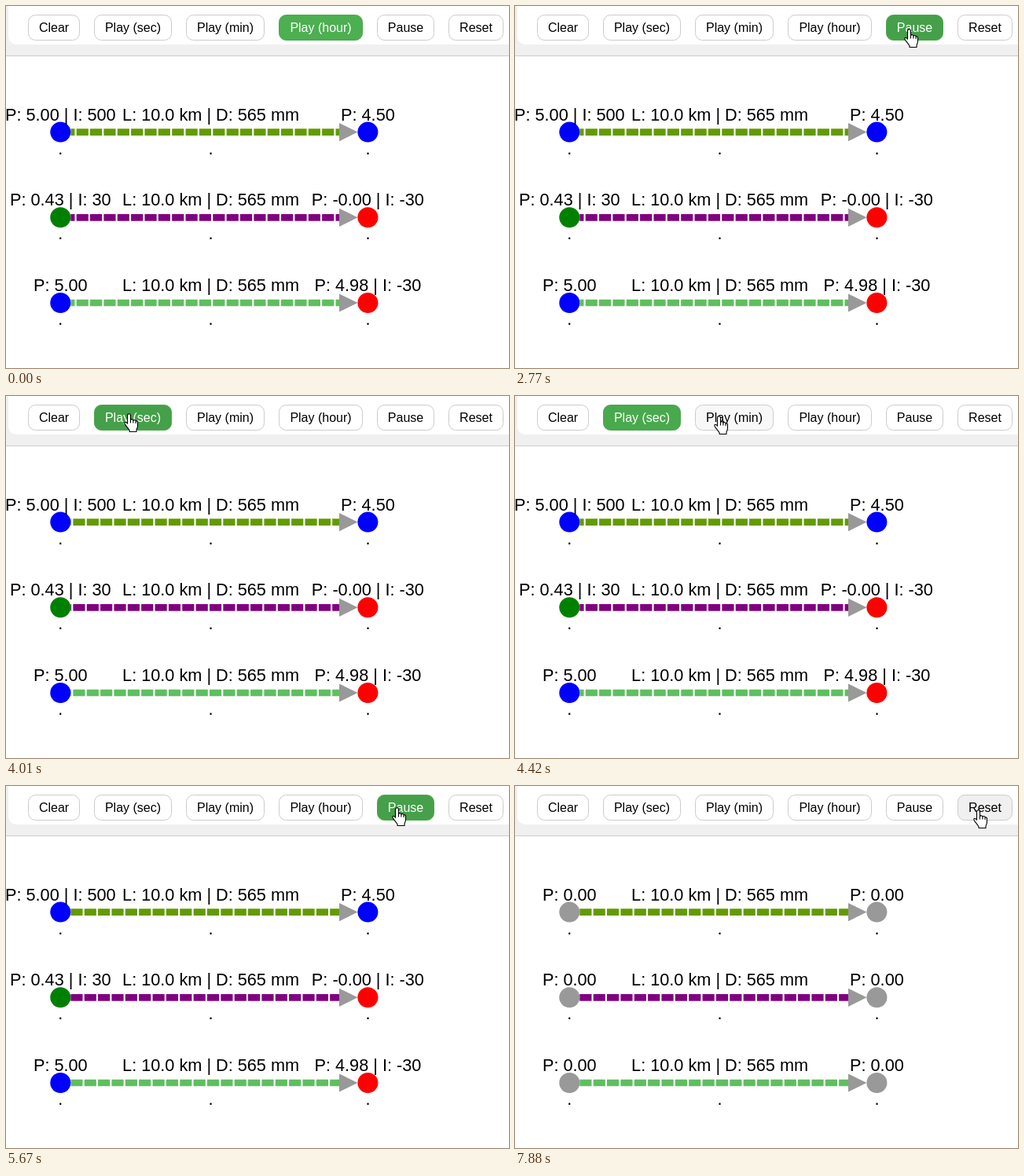
An HTML page that plays this animation: 640 by 461 pixels, repeating every 8 s.

```html
<!DOCTYPE html>
<html lang="en">
<head>
<meta charset="utf-8">
<title>Pipe network player</title>
<style>
  html, body { margin: 0; width: 100%; height: 100%; overflow: hidden; background: #fff; }
  svg { display: block; width: 640px; height: 461px; }
  text { font-family: "Liberation Sans", Arial, sans-serif; text-anchor: middle; }
  #bar text { font-size: 16px; }
  #net text { font-size: 21.7px; }
</style>
</head>
<body>
<svg id="stage" viewBox="0 0 640 461">
  <rect width="640" height="461" fill="#fff"/>
  <rect width="640" height="63" fill="#f0f0f0"/>
  <rect y="63" width="640" height="1" fill="#ccc"/>
  <rect x="3" y="-20" width="660" height="69" rx="10" fill="#fff"/>
  <g id="bar"></g>
  <g id="net"></g>
  <g id="cursor" fill="#fff" stroke="#000" stroke-width="1.1" stroke-linejoin="round" stroke-linecap="round">
    <path id="arrow" d="M0 0V16.5L3.9 13L6.6 19.2L9.2 18.1L6.6 12H11.8Z"/>
    <g id="hand" transform="translate(-1.5 -.5)">
      <path d="M-2 2.2a2 2 0 0 1 4 0V8.2a1.8 1.8 0 0 1 3.4.5a1.8 1.8 0 0 1 3.2.8a1.6 1.6 0 0 1 2.4 1.5V16c0 2-1.5 3.4-1.5 5v2H.6v-1.7C-.6 19.5-2.6 17-4.4 14.6c-1.3-1.8-1.7-2.7-1-3.5s2.2-.2 3.4 1.6Z"/>
      <path fill="none" d="M2 8.4v3M5.4 8.9v2.7M8.6 9.6v2.4"/>
    </g>
  </g>
</svg>
<script>
const LOOP = 8000;
const RESET = 7590, REDRAW = 7660;
const ZOOM = 2.17;
const DASH = 7 * ZOOM, GAP = ZOOM;
const FLOW = { from: 3510, to: 5435, start: -10, speed: 0.0954 };
const FADE = 300, TAPS = 16;

// label, left, width
const BUTTONS = [
  ["Clear", 28, 66], ["Play (sec)", 112, 99], ["Play (min)", 229, 100],
  ["Play (hour)", 347, 107], ["Pause", 472, 73], ["Reset", 563, 70]
];

// time at which each button becomes the active one
const CLICKS = [[-1e9, 3], [2000, 4], [3510, 1], [4650, 2], [5400, 4], [RESET, -1]];

// time, x, y of the pointer tip
const PATH = [
  [800, 577, 458], [1550, 510, 45], [1680, 508, 39], [1750, 508, 38], [1820, 504, 30],
  [2700, 504, 30], [2770, 503, 30], [3060, 370, 20], [3260, 210, 9], [3420, 158, 23],
  [4180, 158, 23], [4410, 261, 26], [4780, 261, 26], [5190, 491, 28], [5280, 499, 28],
  [6480, 499, 28], [6600, 513, 31], [6740, 513, 31], [7150, 589, 32], [7500, 591, 31]
];

// pipe colour, left label, left colour, right label, right colour
const ROWS = [
  ["#639b00", "P: 5.00 | I: 500", "#00f", "P: 4.50", "#00f"],
  ["#800080", "P: 0.43 | I: 30", "#008000", "P: -0.00 | I: -30", "#f00"],
  ["#5fbf5f", "P: 5.00", "#00f", "P: 4.98 | I: -30", "#f00"]
];

const $ = id => document.getElementById(id);

function add(parent, tag, attrs, text) {
  const el = document.createElementNS("http://www.w3.org/2000/svg", tag);
  for (const k in attrs) el.setAttribute(k, attrs[k]);
  if (text) el.textContent = text;
  return parent.appendChild(el);
}

const buttons = BUTTONS.map(([label, x, w]) => ({
  box: add($("bar"), "rect", { x: x + 0.5, y: 11.5, width: w - 1, height: 32, rx: 9 }),
  text: add($("bar"), "text", { x: x + w / 2, y: 33 }, label)
}));

const rows = ROWS.map(([color, leftText, leftFill, rightText, rightFill], i) => {
  const g = add($("net"), "g", { transform: `translate(0 ${160.6 + 108.7 * i})` });
  const pipe = add(g, "path", {
    d: "M82.3 0H424.5", stroke: color, "stroke-width": 4 * ZOOM, "stroke-dasharray": `${DASH} ${GAP}`
  });
  add(g, "path", { d: "M424 -11.6L447.5 0L424 11.6Z", fill: "#999" });
  const node = (x, label, fill) => ({
    label, fill,
    disc: add(g, "circle", { cx: x, cy: 0, r: 6 * ZOOM }),
    text: add(g, "text", { x, y: -15 })
  });
  const nodes = [node(69.3, leftText, leftFill), node(460.4, rightText, rightFill)];
  add(g, "text", { x: 260.6, y: -15 }, "L: 10.0 km | D: 565 mm");
  for (const x of [69.3, 260.6, 460.4]) add(g, "text", { x, y: 28 }, ".");
  return { pipe, nodes };
});

function pointer(t) {
  if (t < PATH[0][0]) return null;
  const i = PATH.findIndex(p => p[0] > t);
  if (i < 0) return PATH[PATH.length - 1].slice(1);
  const [t0, x0, y0] = PATH[i - 1], [t1, x1, y1] = PATH[i];
  const u = (t - t0) / (t1 - t0);
  return [x0 + (x1 - x0) * u, y0 + (y1 - y0) * u];
}

function hovered(t) {
  const p = pointer(t);
  if (!p) return -1;
  return BUTTONS.findIndex(([, x, w]) => p[0] >= x && p[0] < x + w && p[1] >= 11 && p[1] < 44);
}

const active = t => CLICKS.reduce((now, [at, id]) => t >= at ? id : now, -1);

function target(id, on, over) {
  if (id === on) return id === over ? [69, 160, 73] : [76, 175, 80];
  return id === over ? [240, 240, 240] : [255, 255, 255];
}

// eased fade: mean of the recent target colours, weighted by an ease-out curve
function drawButtons(t) {
  const past = Array.from({ length: TAPS }, (_, i) => {
    const at = t - FADE * (1 - Math.sqrt(1 - (i + 0.5) / TAPS));
    return [active(at), hovered(at)];
  });
  const on = active(t);
  buttons.forEach(({ box, text }, id) => {
    const sum = [0, 0, 0];
    for (const [a, h] of past) target(id, a, h).forEach((v, k) => sum[k] += v / TAPS);
    box.setAttribute("fill", `rgb(${sum.map(Math.round)})`);
    box.setAttribute("stroke", id === on ? "#4ca650" : "#ccc");
    text.setAttribute("fill", id === on ? "#fff" : "#000");
  });
}

function drawNet(t) {
  const cleared = t >= RESET;
  const run = Math.min(Math.max(t, FLOW.from), FLOW.to) - FLOW.from;
  const shift = cleared ? 0 : FLOW.start + FLOW.speed * run;
  $("net").setAttribute("visibility", cleared && t < REDRAW ? "hidden" : "visible");
  for (const { pipe, nodes } of rows) {
    pipe.setAttribute("stroke-dashoffset", -shift);
    for (const n of nodes) {
      n.disc.setAttribute("fill", cleared ? "#999" : n.fill);
      n.text.textContent = cleared ? "P: 0.00" : n.label;
    }
  }
}

function drawCursor(t) {
  const p = pointer(t);
  $("cursor").style.display = p ? "" : "none";
  if (!p) return;
  const over = hovered(t) >= 0;
  $("cursor").setAttribute("transform", `translate(${p.map(Math.round)})`);
  $("hand").style.display = over ? "" : "none";
  $("arrow").style.display = over ? "none" : "";
}

const begin = performance.now();
function frame() {
  const t = (performance.now() - begin) % LOOP;
  drawButtons(t);
  drawNet(t);
  drawCursor(t);
  requestAnimationFrame(frame);
}
frame();
</script>
</body>
</html>
```
